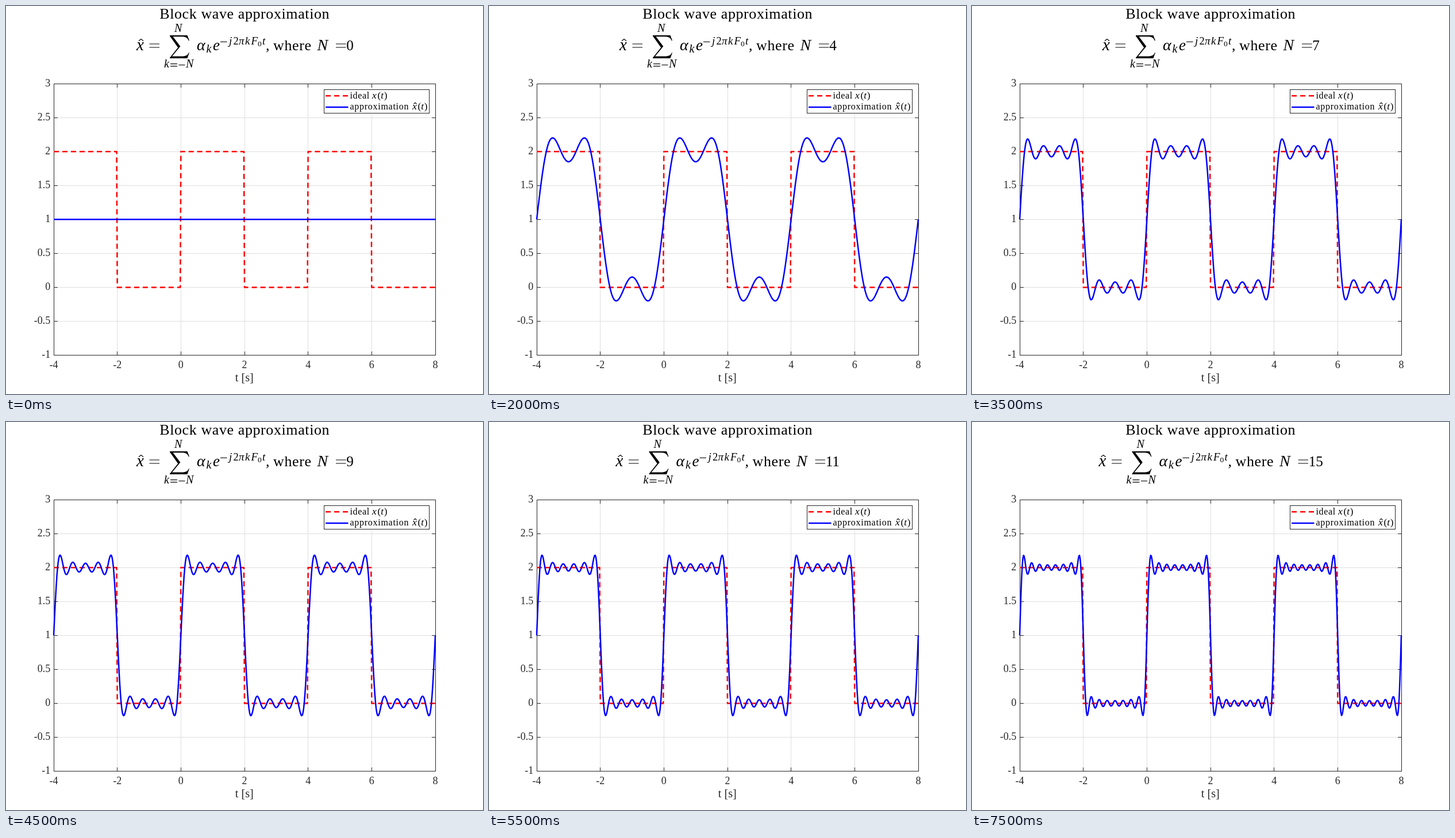
An HTML page for the animation above (8000 ms loop, 830 by 675 pixels).

```html
<!DOCTYPE html>
<html lang="en">
<head>
<meta charset="utf-8">
<title>Block wave approximation</title>
<style>
  html, body { margin: 0; width: 100%; height: 100%; overflow: hidden; background: #fff; }
  svg { display: block; width: 830px; height: 675px; }
  text { font-family: "Liberation Serif", "Times New Roman", serif; white-space: pre; }
  .it { font-style: italic; }
  .axis { stroke: #262626; fill: none; }
  .grid { stroke: #dedede; fill: none; }
  .ideal { stroke: #f00; stroke-width: 2.5; stroke-dasharray: 9 6; fill: none; stroke-linejoin: round; }
  .approx { stroke: #00f; stroke-width: 2.5; fill: none; stroke-linejoin: round; }
  .rule { stroke: #000; stroke-width: 1.1; fill: none; }
</style>
</head>
<body>
<svg id="stage" viewBox="0 0 830 675"></svg>
<script>
const STEP = 500, COUNT = 16;
const stage = document.getElementById('stage');

const X = t => 83 + (t + 4) * 664 / 12;
const Y = v => 135 + (3 - v) * 472.5 / 4;
const snap = v => Math.floor(v + 1e-6) + 0.5;

function add(parent, tag, attrs, content) {
  const el = document.createElementNS('http://www.w3.org/2000/svg', tag);
  for (const key in attrs) el.setAttribute(key, attrs[key]);
  if (content !== undefined) el.textContent = content;
  parent.appendChild(el);
  return el;
}
const path = (parent, cls, d) => add(parent, 'path', { class: cls, d });
const text = (parent, x, y, size, str, opts = {}) =>
  add(parent, 'text', { x, y, 'font-size': size, ...opts }, str);
const italic = (parent, x, y, size, str, opts = {}) =>
  text(parent, x, y, size, str, { class: 'it', ...opts });
const bars = (parent, x, width, ...rows) =>
  path(parent, 'rule', rows.map(y => `M${x} ${y}h${width}`).join(''));
const hat = (parent, x, y, r) =>
  path(parent, 'rule', `M${x - r} ${y + r * 0.8}L${x} ${y}L${x + r} ${y + r * 0.8}`);

// Title and formula
text(stage, 415.2, 22, 26, 'Block wave approximation',
  { 'text-anchor': 'middle', 'letter-spacing': '.023em' });

const formula = add(stage, 'g', {});
italic(formula, 227, 77, 29, 'x');
hat(formula, 235, 57.5, 4);
bars(formula, 249.5, 17.5, 66, 72);
add(formula, 'path', {
  d: 'M285 51H315.5L319 60.3H317.7C316 55 312 53.3 305 53.3H290.5L303.3 70.2L289 87.6' +
     'H305C312.3 87.6 316.3 86 317.9 81.3H319L315.5 91H285V90L299.2 72.2L285 52.3Z'
});
italic(formula, 293, 45, 20, 'N');
italic(formula, 275, 107, 20, 'k');
bars(formula, 286, 12, 100.6, 104.6);
bars(formula, 300.5, 11, 102.6);
italic(formula, 313, 107, 20, 'N');
italic(formula, 332, 77, 28, 'α');
italic(formula, 348.5, 81, 20, 'k');
italic(formula, 360, 77, 27, 'e');
bars(formula, 373, 11.5, 62.4);
italic(formula, 388, 67, 19, 'j');
text(formula, 395.5, 67, 18.5, '2');
italic(formula, 405, 67, 19, 'π');
italic(formula, 416, 67, 19, 'k');
italic(formula, 426.5, 67, 19, 'F');
text(formula, 438, 70, 13.5, '0');
italic(formula, 446, 67, 19, 't');
text(formula, 452, 77, 26, ',');
text(formula, 465, 77, 26, 'where', { 'letter-spacing': '.025em' });
italic(formula, 541.5, 77, 28, 'N');
bars(formula, 574, 17.5, 66, 72);
const counter = text(formula, 592.2, 76.5, 25.2, '0');

// Grid, frame and ticks
const left = snap(X(-4)), right = snap(X(8)), top_ = snap(Y(3)), bottom = snap(Y(-1));
let grid = '', ticks = `M${left} ${top_}H${right}V${bottom}H${left}Z`;
const label = { fill: '#262626' };
for (let t = -4; t <= 8; t += 2) {
  const x = snap(X(t));
  if (t > -4 && t < 8) grid += `M${x} ${top_}V${bottom}`;
  ticks += `M${x} ${top_}v6.5M${x} ${bottom}v-6.5`;
  text(stage, X(t), 630, 18, String(t).replace('-', '-'), { ...label, 'text-anchor': 'middle' });
}
for (let v = -1; v <= 3; v += 0.5) {
  const y = snap(Y(v));
  if (v > -1 && v < 3) grid += `M${left} ${y}H${right}`;
  ticks += `M${left} ${y}h6.5M${right} ${y}h-6.5`;
  text(stage, 77.3, Y(v) + 4.7, 18, String(v), { ...label, 'text-anchor': 'end' });
}
path(stage, 'grid', grid);
path(stage, 'axis', ticks);
text(stage, 414.8, 653, 20.2, 't [s]', { ...label, 'text-anchor': 'middle' });

// Block wave: each edge leans over one sample
let ideal = `M${X(-4)} ${Y(2)}`;
for (let t = -2, high = true; t < 8; t += 2, high = !high) {
  ideal += `L${X(t - 0.02)} ${Y(high ? 2 : 0)}L${X(t)} ${Y(high ? 0 : 2)}`;
}
path(stage, 'ideal', ideal + `L${X(8)} ${Y(0)}`);
const curve = path(stage, 'approx', '');

// Legend
add(stage, 'rect', { x: 553.5, y: 145.5, width: 183, height: 41, fill: '#fff', stroke: '#262626' });
path(stage, 'ideal', 'M556 156.3H595.5');
path(stage, 'approx', 'M556 176H595.5');
text(stage, 598.5, 161, 16, 'ideal', { 'letter-spacing': '.04em' });
text(stage, 598.5, 180.3, 16, 'approximation', { 'letter-spacing': '.045em' });
for (const [x, y] of [[637, 161], [707, 180.3]]) {
  italic(stage, x, y, 17.5, 'x');
  text(stage, x + 9.5, y, 17, '(');
  italic(stage, x + 15.3, y, 17, 't');
  text(stage, x + 20.8, y, 17, ')');
}
hat(stage, 712, 168.3, 2.5);

function partialSum(t, n) {
  let sum = 1;
  for (let k = 1; k <= n; k += 2) sum += 4 / (Math.PI * k) * Math.sin(k * Math.PI * t / 2);
  return sum;
}

function show(n) {
  const points = [];
  for (let i = 0; i <= 600; i++) {
    const t = -4 + i * 0.02;
    points.push(X(t).toFixed(2) + ' ' + Y(partialSum(t, n)).toFixed(2));
  }
  curve.setAttribute('d', 'M' + points.join('L'));
  counter.textContent = n;
  formula.setAttribute('transform', `translate(${n > 9 ? -6.5 : 0} 0)`);
}

let shown = -1;
function frame() {
  const n = Math.floor(performance.now() / STEP) % COUNT;
  if (n !== shown) show(shown = n);
  requestAnimationFrame(frame);
}
frame();
</script>
</body>
</html>
```
